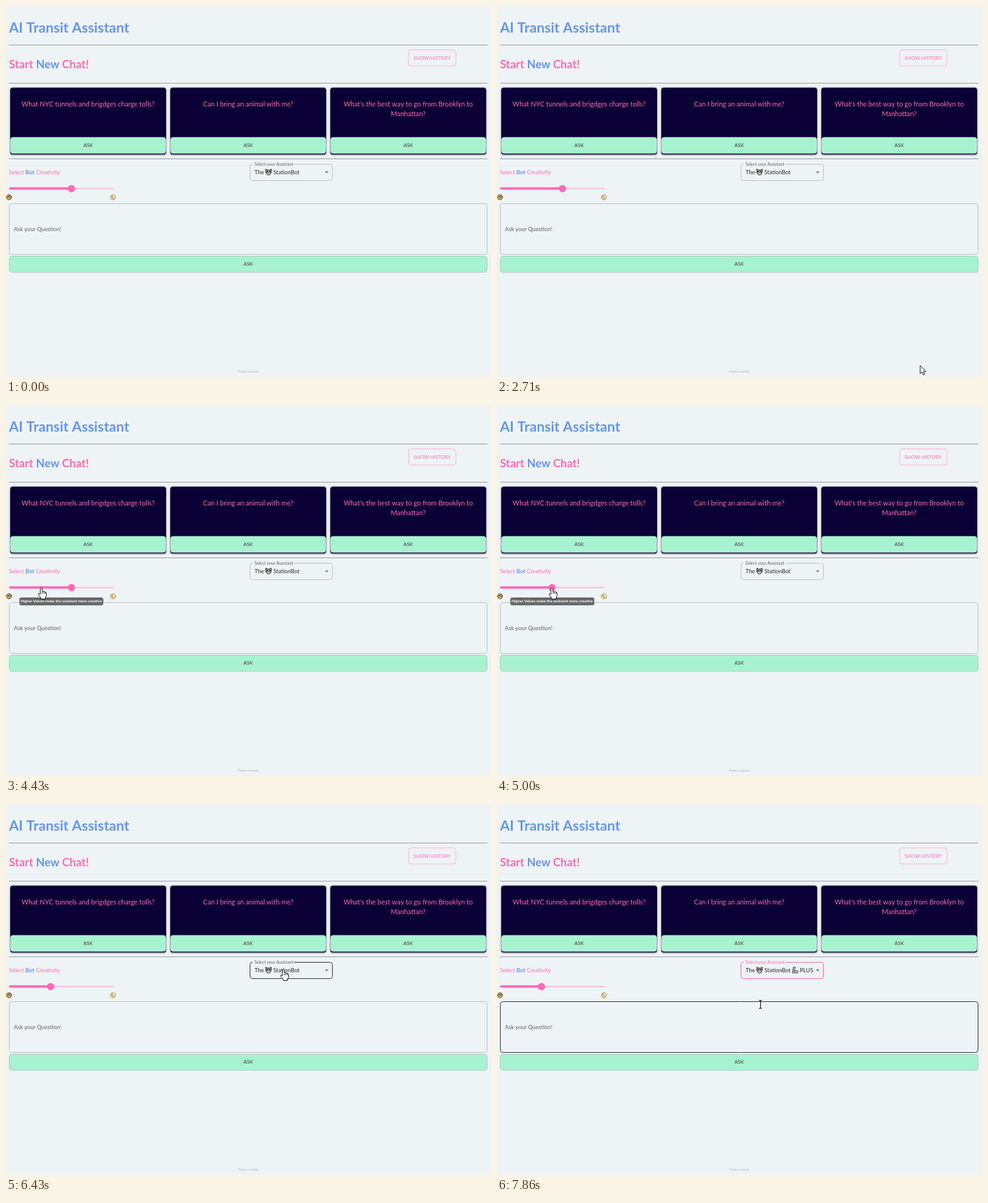
An HTML page with a canvas for the animation above (8 s loop, 800 px wide and 613 px high).

```html
<!DOCTYPE html>
<html lang="en">
<head>
<meta charset="utf-8">
<title>Transit Assistant</title>
<style>
  html, body { margin: 0; width: 100%; height: 100%; overflow: hidden; background: #eef3f5; }
  canvas { display: block; width: 800px; height: 613px; }
</style>
</head>
<body>
<canvas id="stage" width="800" height="613"></canvas>
<script>
const ctx = document.getElementById('stage').getContext('2d');
const LOOP = 8000, STEP = 1000 / 7;
const BG = '#eef3f5', PINK = '#ff69b4', BLUE = '#6495ed', NAVY = '#0b0035',
      GREEN = '#a7f3d0', INK = '#262829', LINE = '#b8bdbf', ASK = '#4d3038';

// Pointer path: [step, x, y], eased between points
const PATH = [
  [19, 698, 594], [22, 400, 440], [25, 247.5, 352], [27, 215, 342], [29, 80, 306],
  [31, 58, 302], [33, 106, 302], [34, 107, 302], [36, 74, 302], [37, 80, 302],
  [39, 243, 298], [42, 345, 294], [45, 457.5, 273], [47, 455, 279], [49, 434.5, 331], [56, 434.5, 331]
];
const THUMB = { from: 108, to: 73.5 };

function pointerAt(step) {
  if (step < PATH[0][0]) return null;
  const i = Math.max(1, PATH.findIndex(p => p[0] >= step));
  const [s0, x0, y0] = PATH[i - 1], [s1, x1, y1] = PATH[i];
  const k = (step - s0) / (s1 - s0);
  return { x: x0 + (x1 - x0) * k, y: y0 + (y1 - y0) * k };
}

function text(str, x, y, size, color, { bold = false, align = 'left' } = {}) {
  ctx.font = `${bold ? 700 : 400} ${size}px Lato, sans-serif`;
  ctx.textAlign = align;
  ctx.fillStyle = color;
  ctx.fillText(str, x, y);
  return x + ctx.measureText(str).width;
}

// Runs are [string, color, bold]
function runs(list, x, y, size) {
  for (const [str, color, bold] of list) x = text(str, x, y, size, color, { bold });
}

function box(x, y, w, h, r, fill, stroke, width = 1) {
  ctx.beginPath();
  ctx.roundRect(x, y, w, h, r);
  if (fill) { ctx.fillStyle = fill; ctx.fill(); }
  if (stroke) { ctx.strokeStyle = stroke; ctx.lineWidth = width; ctx.stroke(); }
}

function rect(x, y, w, h, color) {
  ctx.fillStyle = color;
  ctx.fillRect(x, y, w, h);
}

function dot(x, y, r, fill, stroke) {
  ctx.beginPath();
  ctx.arc(x, y, r, 0, Math.PI * 2);
  ctx.fillStyle = fill;
  ctx.fill();
  if (stroke) { ctx.strokeStyle = stroke; ctx.lineWidth = 1; ctx.stroke(); }
}

function shape(d, x, y, fill, stroke, width = 1) {
  const path = new Path2D(d);
  ctx.save();
  ctx.translate(x, y);
  ctx.lineJoin = 'round';
  ctx.fillStyle = fill;
  ctx.fill(path);
  if (stroke) { ctx.strokeStyle = stroke; ctx.lineWidth = width; ctx.stroke(path); }
  ctx.restore();
}

function shadow(color, blur, dy = 0) {
  ctx.shadowColor = color;
  ctx.shadowBlur = blur;
  ctx.shadowOffsetY = dy;
}

function card(x, lines) {
  ctx.save();
  shadow('rgba(0,0,0,.5)', 3, 0.5);
  box(x, 135, 257, 110.5, 4, NAVY);
  ctx.restore();
  box(x - 0.5, 134.5, 258, 111.5, 4, null, '#b4b4c0', 0.8);
  lines.forEach((line, i) => text(line, x + 128.5, 166 + i * 16, 11.14, PINK, { align: 'center' }));
  box(x + 0.5, 217, 256, 26.5, 4, GREEN, '#b9d8ce', 0.8);
  text('ASK', x + 128.5, 233, 8.12, ASK, { align: 'center' });
}

function animalFace(x, y) {
  shape('M-4.5-5 L-1.8-3.4 H1.8 L4.5-5 L4.6 .5 L2.6 4 L0 5 L-2.6 4 L-4.6 .5Z', x, y, '#8d8983', '#3a3735', 1);
  dot(x, y + 2, 2, '#e9e6e2');
  for (const side of [-1, 1]) dot(x + side * 2.1, y - 0.6, 1.1, '#292625');
  dot(x, y + 1.3, 0.8, '#292625');
}

function metalArm(x, y) {
  shape('M-3-5 L1-5 L.4-2.4 L-1.2-2 L-.6 1 Q3.4-.8 5 2 L4.8 4.8 H-4.4 Z', x, y, '#a9adb0', '#55595c', 0.9);
  dot(x - 1.4, y + 2.2, 1, '#55595c');
}

function botName(y, plus) {
  text('The', 410, y, 9.28, INK);
  animalFace(433, y - 3.6);
  text('StationBot', 441, y, 9.28, INK);
  if (plus) {
    metalArm(491.5, y - 3.6);
    text('PLUS', 499.5, y, 9.28, INK);
  }
}

function header() {
  for (const y of [64, 127, 252]) rect(5, y, 789, 1, '#96999b');
  text('AI Transit Assistant', 5, 44, 23.2, BLUE, { bold: true });
  runs([['Start ', PINK, true], ['New ', BLUE, true], ['Chat!', PINK, true]], 5, 102.5, 18.56);
  box(664, 72.5, 78, 26.5, 4, null, '#f7b2d5');
  text('SHOW HISTORY', 703, 88.5, 8.12, PINK, { align: 'center' });
}

function slider(thumb) {
  runs([['Select ', PINK], ['Bot', BLUE, true], [' Creativity', PINK]], 5, 278, 9.28);
  box(5, 300.4, 173, 2.3, 1, '#f5bfdc');
  box(5, 299.5, thumb - 5, 4, 2, PINK);
  dot(thumb, 301.7, 6, PINK);
  dot(5, 316, 4.2, '#d2ab62', '#5e4728');
  dot(3.6, 315, 1, '#4a3820');
  dot(6.6, 315, 1.5, '#f1e3b8', '#4a3820');
  dot(176.5, 316, 4.2, '#f0dc98', '#a58c55');
  dot(175, 315, 0.9, '#6d5930');
  dot(178, 314.6, 1.1, '#fffbe9');
  rect(175.5, 317.4, 2.6, 1, '#b06a52');
}

function select(border, label, width, plus) {
  box(402.5, 261.5, 136, 27, 4, null, border, width);
  rect(407, 260, 68, 3, BG);
  text('Select your Assistant', 410, 263.6, 6.96, label);
  botName(278, plus);
  shape('M-3-1.5 H3 L0 1.6Z', 529, 275, '#707476');
}

function question(hover) {
  box(5.5, 326.5, 788, 84, 4, null, hover ? INK : LINE);
  text('Ask your Question!', 13, 371.5, 9.28, '#5f6263');
  box(5.5, 413.5, 788, 26.5, 4, GREEN, '#b3c4be');
  text('ASK', 399.5, 429.3, 8.12, ASK, { align: 'center' });
}

function menu(alpha, pointer, pressed) {
  ctx.save();
  ctx.globalAlpha = alpha;
  ctx.save();
  shadow('rgba(0,0,0,.3)', 6, 2);
  box(402, 289, 136.5, 51.5, 3, '#fff');
  ctx.restore();
  rect(402, 293.6, 136.5, 21, '#fff0f7');
  if (pointer.y > 314) rect(402, 314.6, 136.5, 21, pressed ? '#e6e6e6' : '#f5f5f5');
  botName(307.5, false);
  botName(328.5, true);
  ctx.restore();
}

function tooltip(alpha) {
  ctx.save();
  ctx.globalAlpha = alpha;
  box(22, 318, 138.5, 13, 3.5, '#68696a');
  text('Higher Values make the assistant more creative', 91, 326.3, 6.38, '#fff', { bold: true, align: 'center' });
  ctx.restore();
}

const cursors = {
  arrow: p => shape('M0 0 V13.5 L3.1 10.7 L5.2 15.7 L7.5 14.7 L5.4 9.8 H9.5Z', p.x, p.y, '#fff', '#111'),
  hand: p => {
    shape('M-1.5 11 V1 Q0-1 1.6 1 V6 Q3 5 4 6.6 Q5.5 5.8 6.5 7.3 Q8.4 6.8 8.6 9 V13 L7 16 V18.5 H-.5 V16.5 L-4.6 11.3 Q-4.5 8.6-2.6 10Z',
      p.x, p.y, '#fff', '#111');
    for (const x of [1.6, 4, 6.4]) rect(p.x + x - 0.3, p.y + 6.5, 0.8, 3.5, '#111');
  },
  beam: p => {
    rect(p.x - 0.5, p.y - 6, 1.2, 12, '#111');
    for (const dy of [-7, 6]) rect(p.x - 2.5, p.y + dy, 5, 1.1, '#111');
  }
};

const inside = (p, x, y, w, h) => !!p && p.x >= x && p.x <= x + w && p.y >= y && p.y <= y + h;

function draw(step) {
  const pointer = pointerAt(step);
  const focused = step >= 46;
  const menuAlpha = { 46: 0.35, 53: 0.6, 54: 0.15 }[step] ?? (step > 46 && step < 53 ? 1 : 0);
  const overSelect = inside(pointer, 402, 261, 137, 28);
  const overQuestion = inside(pointer, 5, 326, 789, 85) && !menuAlpha;
  const overSlider = inside(pointer, 0, 294, 182, 16);
  const overButton = inside(pointer, 5, 413, 789, 28);
  const thumb = step < 35 ? THUMB.from : step === 35 ? (THUMB.from + THUMB.to) / 2 : THUMB.to;
  const tipAlpha = { 29: 0.5, 39: 0.95, 40: 0.4 }[step] ?? (step > 29 && step < 39 ? 1 : 0);

  rect(0, 0, 800, 613, BG);
  header();
  card(7, ['What NYC tunnels and brigdges charge tolls?']);
  card(271, ['Can I bring an animal with me?']);
  card(535, ["What's the best way to go from Brooklyn to", 'Manhattan?']);
  slider(thumb);
  select(focused ? PINK : overSelect ? INK : LINE, focused ? PINK : '#5f6263', focused ? 1.2 : 1, step >= 53);
  question(overQuestion);
  text('Fenlu inside', 399.5, 606, 6.5, '#b4b8ba', { align: 'center' });
  if (menuAlpha) menu(menuAlpha, pointer, step >= 52);
  if (tipAlpha) tooltip(tipAlpha);
  if (pointer) {
    const kind = overQuestion ? 'beam' : overSelect || overSlider || overButton || menuAlpha ? 'hand' : 'arrow';
    cursors[kind](pointer);
  }
}

function tick(now) {
  draw(Math.floor(((now % LOOP) + 5) / STEP) % 56);
  requestAnimationFrame(tick);
}
draw(0);
requestAnimationFrame(tick);
</script>
</body>
</html>
```
